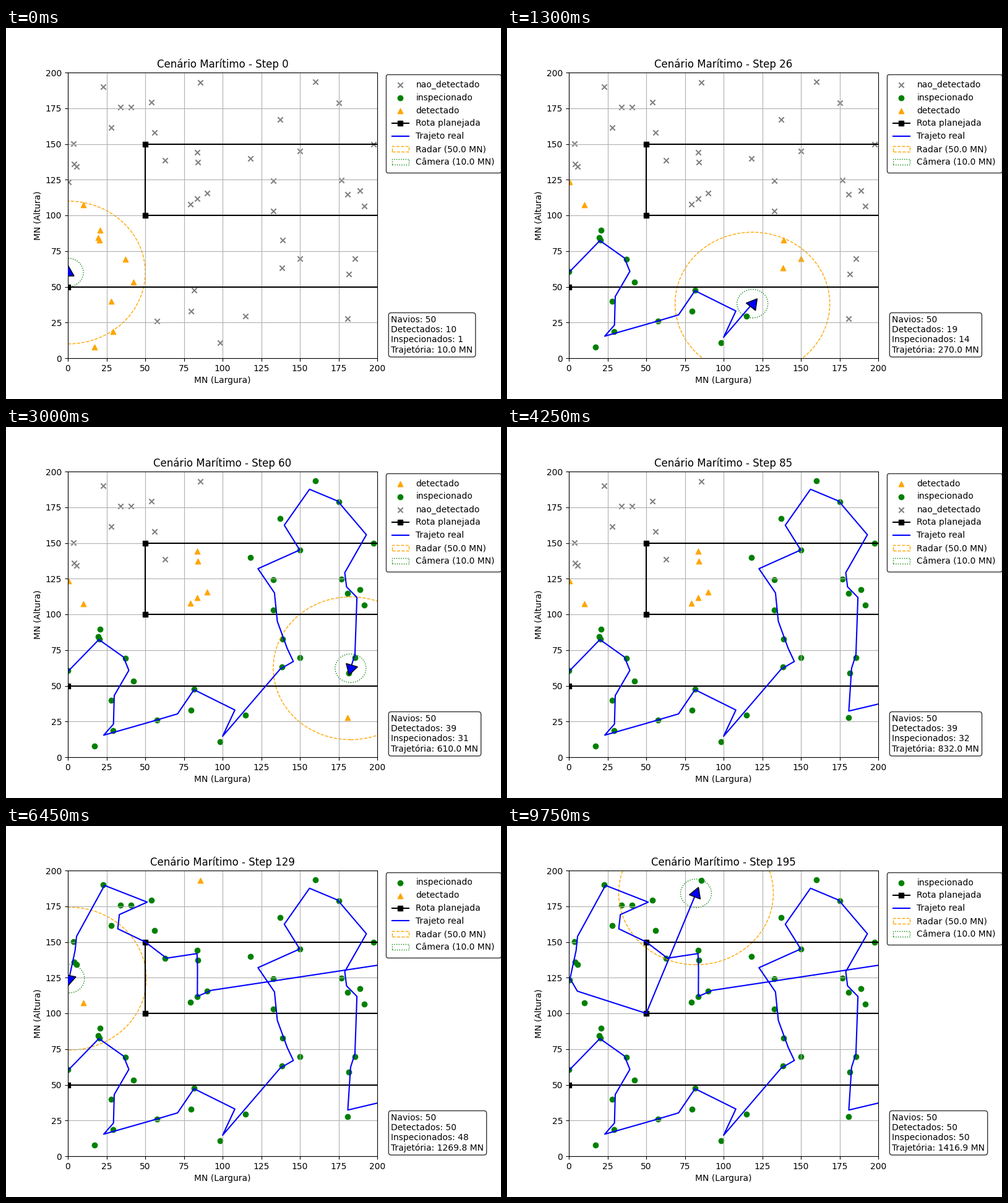
These frames come from a looping animation (800x600 px, 9.8 s). A matplotlib script:

```python
import numpy as np
import matplotlib.pyplot as plt
from matplotlib.animation import FuncAnimation

FRAMES, INTERVAL = 196, 50
SIZE = 200
STEP, RADAR, CAMERA = 10.0, 50.0, 10.0
HIDDEN, FOUND, DONE = "nao_detectado", "detectado", "inspecionado"

ROUTE = [(0, 50), (250, 50), (250, 100), (50, 100), (50, 150), (300, 150)]
SHIPS = np.random.RandomState(1).uniform(0, SIZE, (50, 2))


def simulate():
    """Greedy patrol: always head for the nearest found ship or waypoint."""
    pos = np.array(ROUTE[0], float)
    waypoints = [np.array(p, float) for p in ROUTE[1:]]
    status = np.full(len(SHIPS), HIDDEN, dtype=object)
    path, states = [pos], []
    total, heading = 0.0, 90.0

    def promote(old, new, reach):
        near = np.hypot(*(SHIPS - pos).T) <= reach
        status[near & (status == old)] = new

    promote(HIDDEN, FOUND, RADAR)
    for _ in range(FRAMES):
        targets = waypoints + list(SHIPS[status == FOUND])
        if targets:
            gaps = [np.hypot(*(t - pos)) for t in targets]
            best = int(np.argmin(gaps))
            gap, delta = gaps[best], targets[best] - pos
            move = min(STEP, gap)
            if move > 1e-6:
                heading = np.degrees(np.arctan2(delta[1], delta[0]))
                pos = pos + delta * move / gap
                total += move
            # a waypoint is ticked off only by a shortened move
            if best < len(waypoints) and gap < STEP - 1e-6:
                waypoints.pop(best)
        promote(HIDDEN, FOUND, RADAR)
        promote(FOUND, DONE, CAMERA)
        path.append(pos)
        states.append((status.copy(), heading, total))
    return np.array(path), states


path, states = simulate()

fig, ax = plt.subplots(figsize=(8, 6), dpi=100)
fig.subplots_adjust(left=0.125, right=0.75, bottom=0.11, top=0.88)
ax.set(xlim=(0, SIZE), ylim=(0, SIZE), xlabel="MN (Largura)", ylabel="MN (Altura)")
ax.set_xticks(range(0, SIZE + 1, 25))
ax.set_yticks(range(0, SIZE + 1, 25))
ax.grid(True)
title = ax.set_title("")

groups = {
    name: ax.scatter([], [], c=color, marker=marker, label=name)
    for name, color, marker in ((HIDDEN, "gray", "x"), (DONE, "green", "o"),
                                (FOUND, "orange", "^"))
}
route, = ax.plot(*zip(*ROUTE), "ks-", label="Rota planejada")
trail, = ax.plot([], [], "b-", label="Trajeto real")


def ring(radius, color, style, name):
    label = f"{name} ({radius} MN)"
    return ax.add_patch(plt.Circle((0, 0), radius, fill=False, ec=color,
                                   ls=style, label=label))


radar = ring(RADAR, "orange", "--", "Radar")
camera = ring(CAMERA, "green", ":", "Câmera")
vessel, = ax.plot([], [], ls="", ms=16, mfc="blue", mec="black", zorder=5)
info = ax.text(1.045, 0.15, "", fontsize=10, va="top", transform=ax.transAxes,
               bbox=dict(boxstyle="round", fc="white", ec="black", alpha=0.8))


def draw(step):
    status, heading, total = states[step]
    pos = path[step + 1]
    for name, group in groups.items():
        group.set_offsets(SHIPS[status == name])
    trail.set_data(*path[:step + 2].T)
    radar.center = camera.center = tuple(pos)
    vessel.set_data([pos[0]], [pos[1]])
    vessel.set_marker((3, 0, heading - 90))

    # legend rows follow the order in which statuses occur in the fleet
    order = dict.fromkeys(status)
    ax.legend(handles=[groups[s] for s in order] + [route, trail, radar, camera],
              loc="upper left", bbox_to_anchor=(1.022, 1), borderpad=0.7,
              borderaxespad=0.2, edgecolor="black", framealpha=0.8)
    title.set_text(f"Cenário Marítimo - Step {step}")
    info.set_text(f"Navios: {len(SHIPS)}\n"
                  f"Detectados: {np.sum(status != HIDDEN)}\n"
                  f"Inspecionados: {np.sum(status == DONE)}\n"
                  f"Trajetória: {total:.1f} MN")
    return []


anim = FuncAnimation(fig, draw, frames=FRAMES, interval=INTERVAL,
                     init_func=lambda: draw(0), repeat=True, repeat_delay=0)
plt.show()
```
